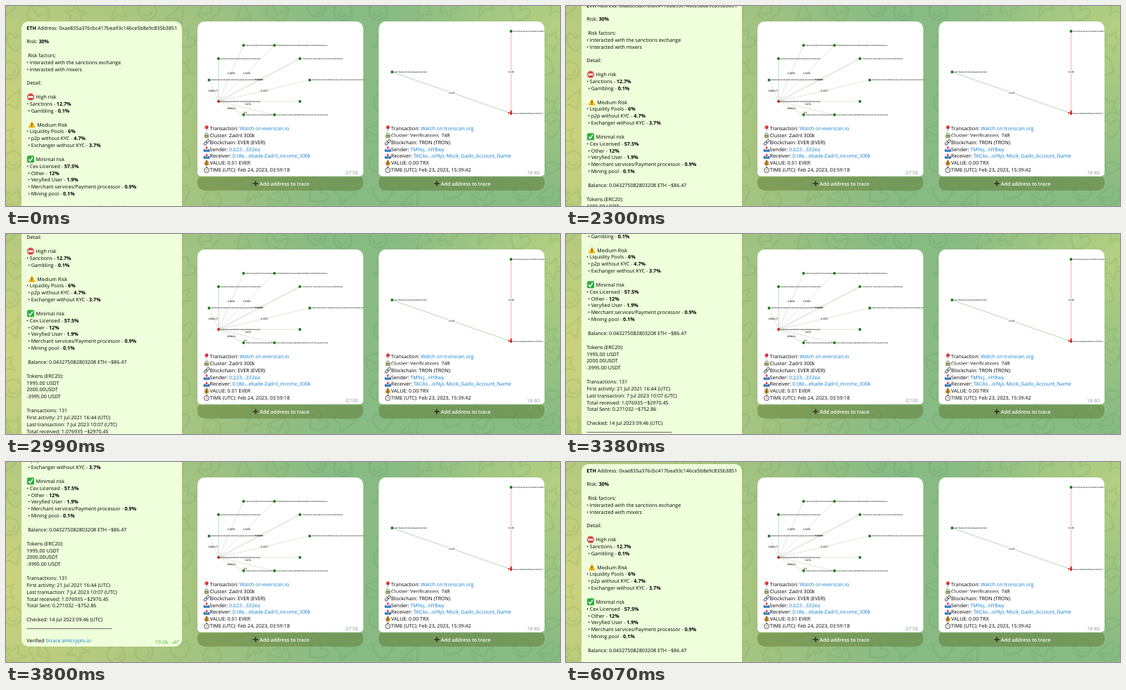
Recreate the animation shown at these times as an HTML page with a canvas. Size 787x285 px, loop 6.1 s.

```html
<!DOCTYPE html>
<html lang="en">
<head>
<meta charset="utf-8">
<title>Address risk report</title>
<style>
html, body { margin: 0; width: 100%; height: 100%; overflow: hidden; background: #88ba84; }
canvas { display: block; width: 787px; height: 285px; }
</style>
</head>
<body>
<canvas id="stage"></canvas>
<script>
const W = 787, H = 285, LOOP = 6100, STEP = 30;
const SCROLL = 191, DOWN_AT = 2030, DOWN_STEPS = 60, UP_AT = 5830, UP_STEPS = 10;
const FONT = '"Open Sans", "Noto Sans", sans-serif';
const SIZE = 7.13, LINE = 9.86;
const INK = '#000', LINK = '#0f7fd0';

const ratio = window.devicePixelRatio || 1;

function makeLayer(canvas, h) {
  canvas.width = Math.round(W * ratio);
  canvas.height = Math.round(h * ratio);
  const c = canvas.getContext('2d');
  c.scale(ratio, ratio);
  c.textBaseline = 'alphabetic';
  c.textRendering = 'geometricPrecision';
  return c;
}

const stage = document.getElementById('stage');
const view = makeLayer(stage, H);
const back = document.createElement('canvas');
const report = document.createElement('canvas');

// Writes [text, colour, weight] runs one after another around the middle line y.
function write(c, x, y, runs, size = SIZE) {
  for (const [text, color = INK, weight = 500] of runs) {
    c.font = `${weight} ${size}px ${FONT}`;
    c.fillStyle = color;
    c.fillText(text, x, y + size * 0.36);
    x += c.measureText(text).width;
  }
}

function box(c, x, y, w, h, r, fill) {
  c.beginPath();
  c.roundRect(x, y, w, h, r);
  c.fillStyle = fill;
  c.fill();
}

function dot(c, x, y, r, fill) {
  c.beginPath();
  c.arc(x, y, r, 0, 7);
  c.fillStyle = fill;
  c.fill();
}

function poly(c, points, fill) {
  c.beginPath();
  points.forEach(([x, y]) => c.lineTo(x, y));
  c.closePath();
  c.fillStyle = fill;
  c.fill();
}

function line(c, points, color, width = 1, dash = []) {
  c.beginPath();
  points.forEach(([x, y]) => c.lineTo(x, y));
  c.strokeStyle = color;
  c.lineWidth = width;
  c.setLineDash(dash);
  c.stroke();
  c.setLineDash([]);
}

// Icons are drawn around their own centre.
const icons = {
  stop(c) {
    dot(c, 0, 0, 5, '#d5332c');
    dot(c, 0, 0, 4.1, '#f0a098');
    dot(c, 0, 0, 3.7, '#d5332c');
    box(c, -3.6, -1.3, 7.2, 2.6, 0.6, '#fff');
  },
  warn(c) {
    c.lineJoin = 'round';
    poly(c, [[0, -4.2], [4.6, 3.9], [-4.6, 3.9]], '#fcc21b');
    line(c, [[0, -4.2], [4.6, 3.9], [-4.6, 3.9], [0, -4.2]], '#f2b21a', 1);
    line(c, [[0, -1.8], [0, 1.2]], '#33302a', 1.2);
    dot(c, 0, 2.7, 0.7, '#33302a');
  },
  check(c) {
    box(c, -5, -5, 10, 10, 1.8, '#2fae3e');
    line(c, [[-2.8, 0.2], [-0.8, 2.5], [3, -2.8]], '#fff', 1.5);
  },
  pin(c) {
    line(c, [[0, 0], [0, 4]], '#8d99a0', 0.9);
    dot(c, 0, -1.7, 2.5, '#d9292f');
    dot(c, -0.7, -2.4, 0.7, '#f08b86');
  },
  lock(c) {
    c.beginPath();
    c.arc(0, -1.3, 2.1, Math.PI, 0);
    c.strokeStyle = '#6c797d';
    c.lineWidth = 1;
    c.stroke();
    box(c, -3.3, -1, 6.6, 5, 0.7, '#9a9f63');
    line(c, [[-2.8, 0.8], [2.8, 0.8]], '#5f7b66', 0.7);
    line(c, [[-2.8, 2.4], [2.8, 2.4]], '#cfc684', 0.7);
  },
  chain(c) {
    c.rotate(-Math.PI / 4);
    c.strokeStyle = '#59666d';
    c.lineWidth = 1.1;
    for (const x of [-4.8, -0.4]) {
      c.beginPath();
      c.roundRect(x, -1.5, 5.2, 3, 1.5);
      c.stroke();
    }
  },
  tray(c, out) {
    poly(c, [[-4.4, 0], [4.4, 0], [4.4, 3.8], [-4.4, 3.8]], '#2f73b8');
    poly(c, [[-3, 0], [3, 0], [1.6, 1.5], [-1.6, 1.5]], '#a3c8e6');
    const tip = out ? -4 : 0.8, base = out ? -1.7 : -1.5;
    poly(c, [[0, tip], [2.1, base], [-2.1, base]], '#d8383b');
    line(c, [[0, -3.6], [0, 0.2]], '#d8383b', 1.3);
  },
  outbox(c) { icons.tray(c, true); },
  inbox(c) { icons.tray(c, false); },
  bag(c) {
    poly(c, [[-1.8, -4], [1.8, -4], [0.9, -1.6], [-0.9, -1.6]], '#b78432');
    dot(c, 0, 0.9, 3.3, '#c99a3e');
    line(c, [[-1.2, -1.9], [1.2, -1.9]], '#6d4a1c', 0.8);
    write(c, -1.4, 1, [['$', '#59401c', 700]], 4.8);
  },
  watch(c) {
    box(c, -0.9, -4.5, 1.8, 1.5, 0.2, '#4c555a');
    dot(c, 0, 0.4, 3.8, '#4c555a');
    dot(c, 0, 0.4, 2.9, '#f4f4f2');
    line(c, [[0, -1.4], [0, 0.5], [1.2, 1.1]], '#c4382f', 0.6);
  }
};

function icon(c, name, x, y) {
  c.save();
  c.translate(x, y);
  icons[name](c);
  c.restore();
}

function seeded(seed) {
  return () => (seed = (seed * 16807) % 2147483647) / 2147483647;
}

function glow(c, x, y, r, rgb) {
  const g = c.createRadialGradient(x, y, 0, x, y, r);
  g.addColorStop(0, `rgba(${rgb},1)`);
  g.addColorStop(1, `rgba(${rgb},0)`);
  c.fillStyle = g;
  c.fillRect(0, 0, W, H);
}

const doodles = [
  c => { c.arc(0, 0, 7, 0, 6.3); c.moveTo(3, 1); c.arc(0, 1, 3, 0, 3.1); },
  c => { c.roundRect(-8, -6, 16, 12, 3); c.moveTo(-8, -5); c.lineTo(0, 2); c.lineTo(8, -5); },
  c => { c.moveTo(0, 7); c.bezierCurveTo(-15, -4, -4, -12, 0, -3); c.bezierCurveTo(4, -12, 15, -4, 0, 7); },
  c => { c.moveTo(-9, 2); c.lineTo(9, -7); c.lineTo(3, 8); c.lineTo(-1, 3); c.closePath(); },
  c => { for (let i = 0; i < 11; i++) { const r = i % 2 ? 4 : 9, a = i * Math.PI / 5; c.lineTo(r * Math.sin(a), -r * Math.cos(a)); } }
];

function drawBackdrop(c) {
  c.fillStyle = '#88ba84';
  c.fillRect(0, 0, W, H);
  glow(c, 0, 170, 480, '204,210,124');
  glow(c, 787, 30, 240, '180,208,130');
  const rnd = seeded(77);
  c.strokeStyle = 'rgba(70,125,65,0.1)';
  c.lineJoin = 'round';
  c.lineWidth = 1.5;
  for (let y = 6; y < H + 30; y += 44) {
    for (let x = 6; x < W + 30; x += 48) {
      c.save();
      c.translate(x + rnd() * 16 - 8, y + rnd() * 14 - 7);
      c.rotate(rnd() * 2 - 1);
      c.scale(1.8, 1.8);
      c.beginPath();
      doodles[Math.floor(rnd() * doodles.length)](c);
      c.stroke();
      c.restore();
    }
  }
}

// Tiny dense node caption, ending at the given x.
function caption(c, x, y, end) {
  const rnd = seeded(Math.round(x * 7 + y));
  let text = '';
  c.font = `600 2.4px ${FONT}`;
  while (c.measureText(text).width < end - x) text += Math.floor(rnd() * 16).toString(16);
  write(c, x, y, [[text, '#222', 600]], 2.4);
}

function amount(c, x, y, text) {
  c.font = `600 3.3px ${FONT}`;
  write(c, x - c.measureText(text).width / 2, y, [[text, '#222', 600]], 3.3);
}

function node(c, x, y, end, color = '#15780f') {
  caption(c, x + 3, y, end);
  dot(c, x, y, 2, color);
}

function drawFanGraph(c) {
  const hub = [302, 136];
  const nodes = [[337.5, 56, 381], [381.5, 56, 456], [302, 75, 361], [417.5, 75, 477], [288.5, 105.5, 366],
    [431.5, 105.5, 508], [417.5, 136, 420], [337.5, 155, 381], [381.5, 155, 456]];
  nodes.forEach(([x, y], i) =>
    line(c, [hub, [x, y]], i === 1 ? '#d3a19c' : '#8dbb88', 0.55, i === 2 || i === 3 ? [] : [1.5, 0.9]));
  nodes.forEach(n => node(c, ...n));
  node(c, ...hub, 361, '#cf2119');
  [[320, 96, '0.0050'], [342, 96, '0.1050'], [359, 105, '0.0048'], [294, 121, '10000.27'],
    [367, 121, '0.7027'], [344, 140, '0.876'], [320, 146, '40000.0'], [340, 152, '0.6']]
    .forEach(a => amount(c, ...a));
}

function drawPairGraph(c) {
  line(c, [[548, 94], [717.5, 153]], '#8fbf89', 0.65);
  line(c, [[717.5, 36], [717.5, 153]], '#efa29e', 0.8);
  node(c, 717.5, 36, 764);
  node(c, 548.5, 94, 597);
  node(c, 717.5, 153, 762, '#cf2119');
  poly(c, [[717.5, 152], [715.8, 149], [719.2, 149]], '#cf2119');
  poly(c, [[716, 153], [713, 153], [714, 150.5]], '#cf2119');
  for (const [x, y] of [[717.5, 94], [633, 124]]) {
    c.fillStyle = '#fff';
    c.fillRect(x - 5.5, y - 2, 11, 4);
    amount(c, x, y, '1e-06');
  }
}

const facts = ['pin', 'lock', 'chain', 'outbox', 'inbox', 'bag', 'watch'];

function drawMessage(c, x, graph, rows, time) {
  box(c, x, 22, 235.5, 220.5, [10, 10, 5, 5], '#fff');
  c.save();
  c.beginPath();
  c.rect(x, 22, 235.5, 220);
  c.clip();
  graph(c);
  c.restore();
  rows.forEach((runs, i) => {
    const y = 174.4 + i * LINE;
    write(c, x + 17.6, y, runs);
    icon(c, facts[i], x + 13, y);
  });
  write(c, x + 210.5, 237, [[time, '#8795a0']]);

  box(c, x, 243.5, 235.5, 19.5, [5, 5, 10, 10], 'rgba(96,122,50,0.5)');
  line(c, [[x + 78.8, 253], [x + 86.2, 253]], '#303a2b', 1.8);
  line(c, [[x + 82.5, 249.3], [x + 82.5, 256.7]], '#303a2b', 1.8);
  write(c, x + 88.3, 253, [['Add address to trace', '#fff', 600]], 7.1);
}

function drawMessages(c) {
  drawMessage(c, 272, drawFanGraph, [
    [['Transaction: '], ['Watch on everscan.io', LINK]],
    [['Cluster: Zadril 300k']],
    [['Blockchain: EVER (EVER)']],
    [['Sender: '], ['0:223...332ea', LINK]],
    [['Receiver: '], ['0:c8e...ebade Zadril_income_300k', LINK]],
    [['VALUE: 0.01 EVER']],
    [['TIME (UTC): Feb 24, 2023, 03:59:18']]
  ], '07:05');
  drawMessage(c, 529.5, drawPairGraph, [
    [['Transaction: '], ['Watch on tronscan.org', LINK]],
    [['Cluster: Verifications_748']],
    [['Blockchain: TRON (TRON)']],
    [['Sender: '], ['TM9xj...HY8wy', LINK]],
    [['Receiver: '], ['TACAs...oiNyL Mock_Gado_Account_Name', LINK]],
    [['VALUE: 0.00 TRX']],
    [['TIME (UTC): Feb 23, 2023, 15:39:42']]
  ], '18:40');
  // The second cluster row is cut off at its foot.
  c.fillStyle = '#fff';
  c.fillRect(546, 186.5, 100, 2.2);
}

// "#name" puts an icon before the text; asterisks enclose bold parts.
const lines = [
  '*ETH* Address: 0xae835a376cbc417bea93c146ce5b8e9c835b3851', '',
  'Risk: *30%*', '',
  ' Risk factors:', '• Interacted with the sanctions exchange', '• Interacted with mixers', '',
  'Detail:', '',
  '#stop High risk', '• Sanctions - *12.7%*', ' • Gambling - *0.1%*', '',
  '#warn Medium Risk', '• Liquidity Pools - *6%*', ' • p2p without KYC - *4.7%*', ' • Exchanger without KYC - *3.7%*', '',
  '#check Minimal risk', '• Cex Licensed - *57.5%*', ' • Other - *12%*', ' • Veryfied User - *1.9%*',
  ' • Merchant services/Payment processor - *0.9%*', ' • Mining pool - *0.1%*', '',
  ' Balance: 0.043275082803208 ETH ~$86.47', '',
  'Tokens (ERC20):', '1995.00 USDT', '2000.00USDT', '-3995.00 USDT', '',
  'Transactions: 131', 'First activity: 21 Jul 2021 16:44 (UTC)', 'Last transaction: 7 Jul 2023 10:07 (UTC)',
  'Total received: 1.076935 ~$2970.45', 'Total Sent: 0.271032 ~$752.86', '',
  'Checked: 14 Jul 2023 09:46 (UTC)'
];

function drawReport(c) {
  box(c, 22, 22, 228, 432, 10, '#efffdb');
  lines.forEach((text, i) => {
    const y = 31 + i * LINE;
    const mark = text.match(/^#(\w+) (.*)/);
    if (mark) {
      const shift = mark[1] === 'warn' ? 1.8 : 0;
      icon(c, mark[1], 35 + shift, y);
      write(c, 42.5 + shift, y, [[mark[2]]]);
    } else {
      write(c, 29.3, y, text.split('*').map((part, k) => [part, INK, k % 2 ? 700 : 500]));
    }
  });
  line(c, [[29.5, 428.5], [150, 428.5]], '#3d4638', 0.8);
  write(c, 29.3, 445.2, [['Verified '], ['btrace.amlcrypto.io', LINK]]);
  write(c, 212, 447.4, [['19:26', '#4fae45']]);
  for (const x of [236, 239.6]) {
    line(c, [[x, 447.7], [x + 2, 449.8], [x + 6, 444.8]], '#4fae45', 0.9);
  }
}

function scrollAt(t) {
  const steps = start => Math.floor((t - start) / STEP) + 1;
  if (t < DOWN_AT) return 0;
  if (t < UP_AT) return SCROLL * Math.min(1, steps(DOWN_AT) / DOWN_STEPS);
  return SCROLL * (1 - steps(UP_AT) / UP_STEPS);
}

const backdrop = makeLayer(back, H);
drawBackdrop(backdrop);
drawMessages(backdrop);
drawReport(makeLayer(report, 460));

function frame() {
  const t = performance.now() % LOOP;
  view.drawImage(back, 0, 0, W, H);
  view.drawImage(report, 0, -Math.round(scrollAt(t)), W, 460);
  requestAnimationFrame(frame);
}
frame();
</script>
</body>
</html>
```
